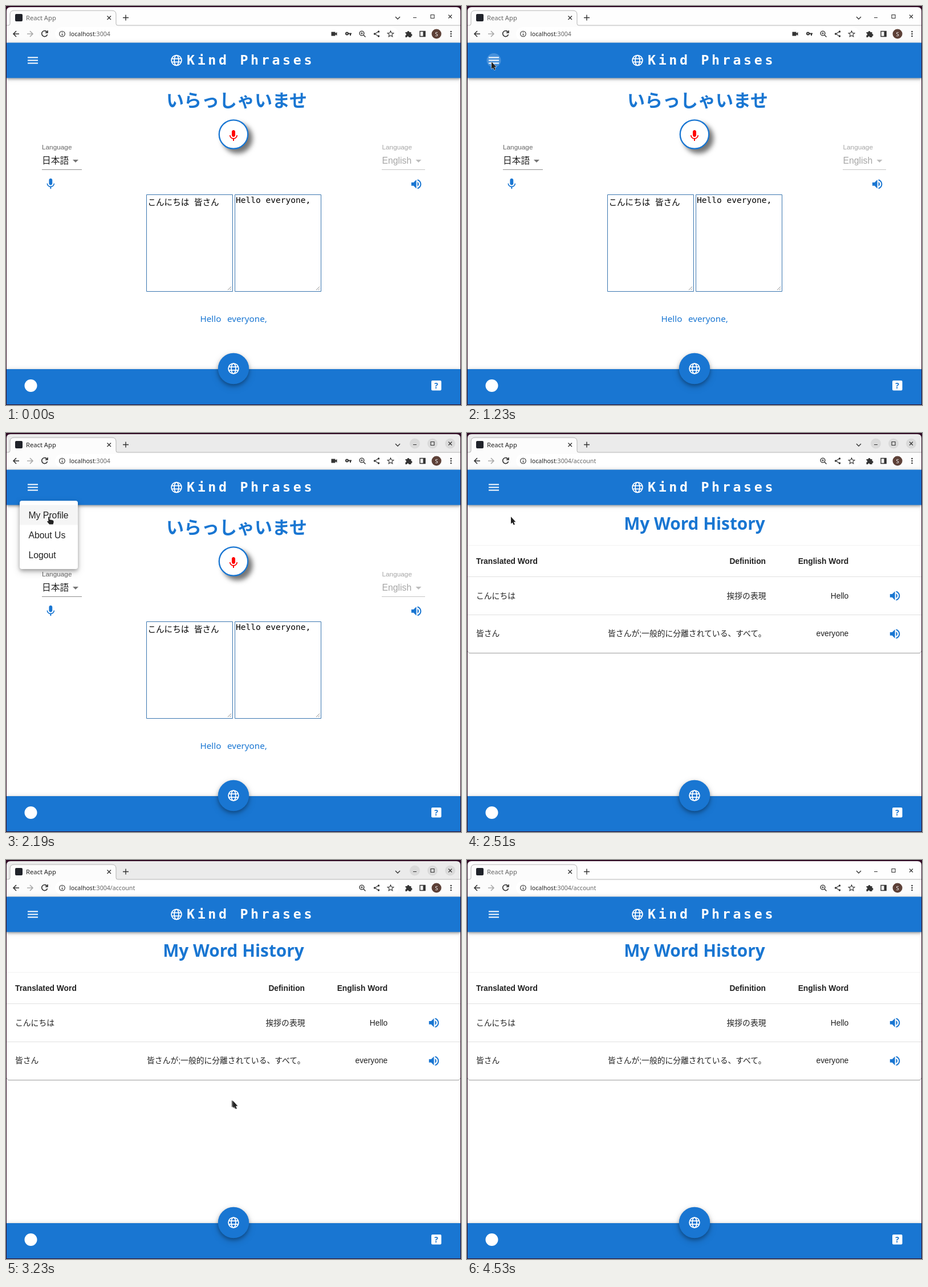
Recreate the animation shown at these times as an HTML page. Size 798 by 701 pixels, loop 4.86 s.

```html
<!DOCTYPE html>
<html lang="en">
<head>
<meta charset="utf-8">
<title>Translator walkthrough</title>
<style>
  html, body { margin: 0; width: 100%; height: 100%; overflow: hidden; background: #300a24; }
  svg { display: block; width: 100%; height: 100%; }
  text { white-space: pre; }
  .ui { font-family: "Noto Sans", sans-serif; }
  .body { font-family: "Liberation Sans", "Noto Sans CJK JP", "Noto Sans CJK", sans-serif; font-size: 15.75px; fill: #212121; }
  .small { font-size: 11.8px; }
  .cell { font-size: 13.8px; }
  .mono { font-family: "DejaVu Sans Mono", "Noto Sans CJK JP", "Noto Sans CJK", monospace; font-size: 14.55px; }
  .bold { font-weight: 700; }
  .end { text-anchor: end; }
  .mid { text-anchor: middle; }
  .blue { fill: #1976d2; }
  .line { fill: none; stroke: #333; stroke-width: 1.4; }
  .soft { filter: drop-shadow(0 2px 2px rgba(0,0,0,.3)) drop-shadow(0 1px 4px rgba(0,0,0,.16)); }
  .lift { filter: drop-shadow(0 3px 3px rgba(0,0,0,.25)) drop-shadow(0 4px 6px rgba(0,0,0,.2)); }
</style>
</head>
<body>
<svg viewBox="0 0 798 701" preserveAspectRatio="none">
  <defs>
    <path id="mic" d="M12 14c1.66 0 3-1.34 3-3V5c0-1.66-1.34-3-3-3S9 3.34 9 5v6c0 1.66 1.34 3 3 3zm5.3-3c0 3-2.54 5.1-5.3 5.1S6.7 14 6.7 11H5c0 3.41 2.72 6.23 6 6.72V21h2v-3.28c3.28-.48 6-3.3 6-6.72h-1.7z"/>
    <path id="speaker" d="M3 9v6h4l5 5V4L7 9H3zm13.5 3c0-1.77-1.02-3.29-2.5-4.03v8.05c1.48-.73 2.5-2.25 2.5-4.02zM14 3.23v2.06c2.89.86 5 3.54 5 6.71s-2.11 5.85-5 6.71v2.06c4.01-.91 7-4.49 7-8.77s-2.99-7.86-7-8.77z"/>
    <g id="globe" fill="none" stroke="#fff" stroke-width="1.8">
      <circle r="8.900"/><ellipse rx="3.900" ry="8.900"/><path d="M-8.400 -2.950H8.400M-8.400 2.950H8.400"/>
    </g>
    <path id="arrow" d="M0 0V12.600L2.800 10.200L4.800 14.600L6.900 13.700L5 9.300H8.400Z"/>
    <path id="hand" d="M-3 .8Q-1.5 -.6 -.6 1.4V5L5 6.3Q7 7 6.6 9.8L5.5 13.5H-1L-5 8.6Q-4.3 7 -2.6 8.2Z"/>
  </defs>

  <!-- Browser window -->
  <path d="M1 65V9Q1 2 8 2H790Q797 2 797 9V65Z" id="titlebar"/>
  <path d="M1 34H7V15Q7 8 14 8H186Q193 8 193 15V34H797V64H1Z" fill="#fcfcfc"/>
  <path d="M1 34H4Q7 34 7 31V15Q7 8 14 8H186Q193 8 193 15V31Q193 34 196 34H797" fill="none" stroke="#b4b4b4"/>
  <rect x="86" y="37" width="602" height="24" rx="12" fill="#fff"/>
  <rect x="16" y="14" width="13" height="13" rx="2" fill="#20232a"/>
  <text class="ui" id="tabTitle" x="35" y="25" font-size="11.2">React App</text>
  <g class="line">
    <path d="M177.500 17.500l6.500 6.500m0-6.500l-6.500 6.500M205 20.500h10m-5-5v10M683 19l4 4 4-4"/>
    <g id="buttonDiscs" fill="#dadada" stroke="none">
      <circle cx="717" cy="18.500" r="9"/><circle cx="748" cy="18.500" r="9"/><circle cx="779" cy="18.500" r="9"/>
    </g>
    <path stroke-width="1.100" d="M714 20.500h6M745 15.500h6v6h-6zM776 15.500l6 6m0-6l-6 6"/>
    <path stroke-width="1.600" d="M23 49H13m5-5l-5 5 5 5M72 46a5 5 0 1 0 .5 4M73 43v4h-4"/>
    <path stroke="#aaa" stroke-width="1.600" d="M37 49h10m-5-5l5 5-5 5"/>
    <circle cx="98.500" cy="49" r="4.800" stroke-width="1.100"/><path d="M98.500 48.500v3.500M98.500 45.800v1.300"/>
    <circle cx="624" cy="48" r="3.900"/><path stroke-width="1" d="M622 48h4m-2-2v4"/><path d="M627 51l3.500 3.500"/>
    <path stroke-width="1.100" d="M653 45l-6 4 6 4"/>
    <path stroke-width="1.100" d="M674.500 43.800l1.500 3.500 3.800.3-2.900 2.500.9 3.700-3.300-2-3.300 2 .9-3.700-2.900-2.500 3.800-.3z"/>
    <path d="M726 44.500h9v9h-9z"/>
  </g>
  <g fill="#333">
    <circle cx="653.500" cy="45" r="1.700"/><circle cx="646.500" cy="49" r="1.700"/><circle cx="653.500" cy="53" r="1.700"/>
    <path d="M731.500 44h4v10h-4zM700.500 46h3a2 2 0 0 1 4 0h3v3a2 2 0 0 1 0 4v2h-4a1.700 1.700 0 0 0-3.400 0h-2.600v-3.500a1.700 1.700 0 0 0 0-3.400z"/>
    <circle cx="780.500" cy="45" r="1.300"/><circle cx="780.500" cy="49" r="1.300"/><circle cx="780.500" cy="53" r="1.300"/>
    <g id="deviceIcons">
      <path d="M570.500 45.500h7v2.500l3-2v6l-3-2v2.500h-7z"/>
      <path fill="none" stroke="#333" stroke-width="2" d="M600 48.500h6M604 48v4"/>
      <circle cx="598" cy="48.500" r="2" fill="none" stroke="#333" stroke-width="2"/>
    </g>
  </g>
  <circle cx="755" cy="49" r="8.500" fill="#5d4037"/>
  <text class="ui mid" x="755" y="52.500" font-size="9.500" fill="#fff">S</text>
  <text class="ui" x="111" y="52.600" font-size="10.600" fill="#222">localhost<tspan fill="#666">:3004<tspan id="urlPath"></tspan></tspan></text>

  <path d="M1 64H797V700H1Z" fill="#fff"/>

  <!-- Translator page -->
  <g id="home">
    <text class="mid bold blue" x="404.500" y="176.500" font-size="31" font-family="Noto Sans CJK JP, Noto Sans CJK, sans-serif">いらっしゃいませ</text>
    <circle cx="399" cy="225.500" r="25.200" fill="#fff" stroke="#1976d2" stroke-width="2.300" style="filter:drop-shadow(7px 7px 4px rgba(0,0,0,.55))"/>
    <use href="#mic" x="387" y="216" fill="#f00"/>
    <g class="body">
      <text class="small" x="63" y="252" style="fill:#666">Language</text>
      <text x="63" y="277">日本語</text>
      <path d="M117 270h10l-5 5z" fill="#757575"/>
      <path d="M63 287.500h70" stroke="#8c8c8c"/>
      <text class="small" x="659.500" y="252" style="fill:#a6a6a6">Language</text>
      <text x="659.500" y="277" style="fill:#a6a6a6">English</text>
      <path d="M718.500 270h10l-5 5z" fill="#bdbdbd"/>
      <path d="M659 287.500h76" stroke="#c4c4c4"/>
    </g>
    <use href="#mic" class="blue" transform="translate(66.700 301) scale(.97)"/>
    <use href="#speaker" class="blue" transform="translate(708 301.300) scale(.97)"/>
    <g fill="#fff" stroke="#3a76b0">
      <path d="M246.500 331.500h151v170h-151zM401.500 331.500h151v170h-151z"/>
      <path stroke="#777" stroke-width=".8" d="M389 499l6-6m-2.500 6l2.500-2.500M544 499l6-6m-2.500 6l2.500-2.500"/>
    </g>
    <text class="mono" x="248.500" y="350">こんにちは 皆さん</text>
    <text class="mono" x="403" y="346">Hello everyone,</text>
    <g class="ui blue" font-size="15.200">
      <text x="340.500" y="554.500">Hello</text><text x="388" y="554.500">everyone,</text>
    </g>
  </g>

  <!-- History page -->
  <g id="history">
    <text class="ui mid bold blue" x="399" y="170" font-size="29.800">My Word History</text>
    <path d="M1 197.500H797" stroke="#f3f3f3"/>
    <path d="M1 252.500H797M1 319.500H797" stroke="#e0e0e0"/>
    <path d="M1.500 383q0 3.500 3.500 3.500H793q3.500 0 3.500-3.500" fill="none" stroke="#b0b0b0"/>
    <path d="M3 387.500H795" stroke="#e6e6e6"/>
    <g class="body cell">
      <g class="bold">
        <text x="16" y="230">Translated Word</text>
        <text class="end" x="524" y="230">Definition</text>
        <text class="end" x="669.300" y="230">English Word</text>
      </g>
      <text x="16" y="290.500">こんにちは</text>
      <text class="end" x="524.500" y="290.500">挨拶の表現</text>
      <text class="end" x="669.300" y="290.500">Hello</text>
      <text x="16" y="357">皆さん</text>
      <text class="end" x="524.500" y="357">皆さんが;一般的に分離されている、すべて。</text>
      <text class="end" x="669.300" y="357">everyone</text>
    </g>
    <use href="#speaker" class="blue" transform="translate(738.900 274.300) scale(.97)"/>
    <use href="#speaker" class="blue" transform="translate(738.900 341.300) scale(.97)"/>
  </g>

  <!-- Header and footer -->
  <path class="blue soft" d="M1 64.500H797V126.500H1Z"/>
  <circle id="hover" cx="47" cy="95.500" r="12.500" fill="#fff" opacity=".2"/>
  <path d="M38 90.500h18M38 95.500h18M38 100.500h18" stroke="#fff" stroke-width="2"/>
  <use href="#globe" x="299" y="95.500"/>
  <text class="mono bold" x="317" y="103" style="font-size:23.300px;letter-spacing:4.650px" fill="#fff">Kind Phrases</text>
  <path class="blue soft" d="M1 638H797V700H1Z"/>
  <circle class="blue lift" cx="399" cy="637" r="27.200"/>
  <use href="#globe" x="399" y="637"/>
  <circle cx="43.500" cy="667" r="11" fill="#fff"/>
  <rect x="746" y="658" width="17.500" height="17.500" rx="2" fill="#fff"/>
  <text class="ui mid bold blue" x="754.700" y="672" font-size="14">?</text>

  <g id="status">
    <path d="M1 683H262q3 0 3 3V700H1Z" fill="#ebebeb" stroke="#c8c8c8" stroke-width=".7"/>
    <text class="ui" x="4.500" y="695.500" font-size="11.600" fill="#444">Waiting for localhost…</text>
  </g>

  <g id="menu">
    <rect class="lift" x="24" y="119" width="102" height="120" rx="4" fill="#fff"/>
    <rect id="row" x="24" width="102" height="35" fill="#f5f5f5"/>
    <g class="body">
      <text x="39.500" y="150">My Profile</text>
      <text x="39.500" y="185">About Us</text>
      <text x="39.500" y="220">Logout</text>
    </g>
  </g>

  <g fill="#222" stroke="#fff" stroke-width="1" paint-order="stroke">
    <use id="trail"/><use id="pointer"/>
  </g>
  <path d="M.5 9V700.500H797.500V9" fill="none" stroke="#300a24"/>
</svg>

<script>
const LOOP = 4860, STEP = 80;
const HOVER = 1150, MENU_OPEN = 1310, HOVER_END = 1630, PAGE = 2510, STATUS = 2590, STATUS_END = 3070;
const ENTER = 590, LEAVE = 3790, BLUR = 4530;

// Pointer tip: time, x, y
const route = [
  [590, 0, 187], [750, 14, 171], [830, 20, 163], [1070, 43, 98], [1630, 43, 98],
  [1870, 72, 148], [1950, 88, 170], [2110, 77, 147], [2510, 77, 147], [2590, 77, 149],
  [2750, 77, 149], [2830, 84, 153], [2910, 118, 181], [3150, 396, 422],
  [3230, 398, 423], [3310, 439, 451], [3710, 768, 497]
];
const el = id => document.getElementById(id);
const show = (id, on) => { el(id).style.display = on ? '' : 'none'; };
const clamp = v => Math.max(0, Math.min(1, v));

function pointAt(t) {
  const next = Math.max(1, route.findIndex(p => p[0] >= t));
  const [t0, x0, y0] = route[next - 1], [t1, x1, y1] = route[next];
  const k = clamp((t - t0) / (t1 - t0));
  return [x0 + (x1 - x0) * k, y0 + (y1 - y0) * k];
}

function place(id, shape, [x, y]) {
  el(id).setAttribute('href', '#' + shape);
  el(id).setAttribute('transform', `translate(${x.toFixed(1)} ${y.toFixed(1)})`);
}

function drawPointer(t) {
  const inside = t >= ENTER && t < LEAVE;
  show('pointer', inside);
  show('trail', false);
  show('row', false);
  if (!inside) return;
  const now = pointAt(t), before = pointAt(t - STEP);
  const overMenu = t > HOVER_END && t < PAGE && now[1] > 119;
  place('pointer', overMenu ? 'hand' : 'arrow', now);

  // Slow movement leaves the previous pointer visible for one step.
  const gap = Math.hypot(now[0] - before[0], now[1] - before[1]);
  if (t > ENTER && !overMenu && gap > 0 && gap < 12) {
    show('trail', true);
    place('trail', 'arrow', before);
  }
  if (overMenu && now[1] >= 127) {
    show('row', true);
    el('row').setAttribute('y', now[1] < 162 ? 126.5 : 161.5);
  }
}

function draw(time) {
  // Movement advances in steps of 80 ms.
  const t = time < ENTER ? 0 : ENTER + Math.floor((time - ENTER) / STEP) * STEP;
  const active = time >= MENU_OPEN && time < BLUR, history = time >= PAGE;
  el('titlebar').setAttribute('fill', active ? '#ebebeb' : '#fefefe');
  el('tabTitle').setAttribute('fill', active ? '#222' : '#666');
  el('urlPath').textContent = history ? '/account' : '';
  show('buttonDiscs', active);
  show('deviceIcons', !history);
  show('home', !history);
  show('history', history);
  show('hover', t >= HOVER && t < HOVER_END);
  show('status', t >= STATUS && t < STATUS_END);

  const opened = clamp((t - MENU_OPEN + 30) / 205);
  const scale = .75 + .25 * clamp(opened * 1.1);
  show('menu', t >= MENU_OPEN && !history);
  el('menu').style.opacity = opened;
  el('menu').setAttribute('transform', `translate(24 119) scale(${scale}) translate(-24 -119)`);
  drawPointer(t);
}

const start = performance.now();
function tick() {
  draw((performance.now() - start) % LOOP);
  requestAnimationFrame(tick);
}
tick();
</script>
</body>
</html>
```
